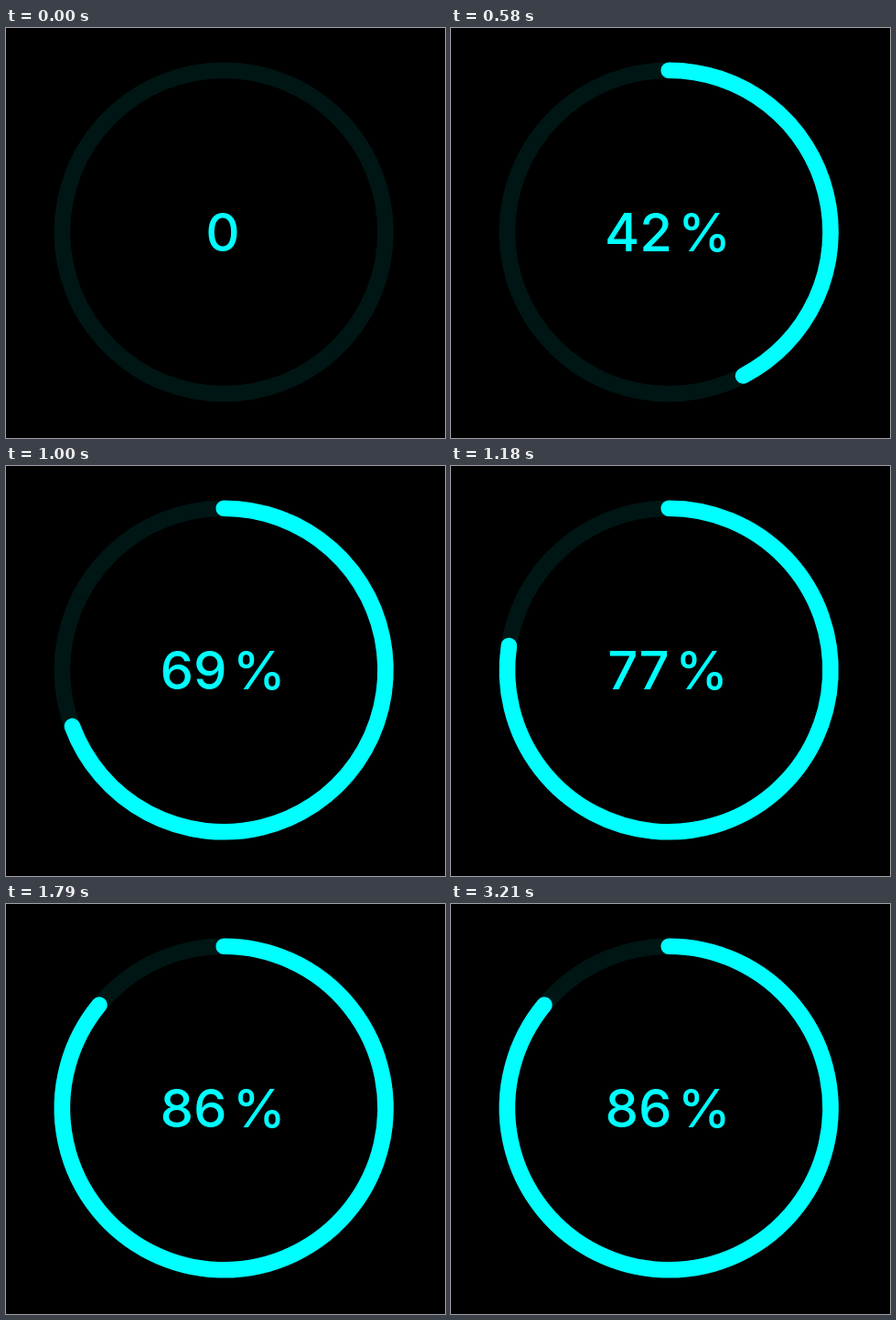
Write an HTML page that moves like this. It is 480 by 448 pixels and loops after 3.24 s.

```html
<!DOCTYPE html>
<html lang="en">
<head>
<meta charset="utf-8">
<title>Progress ring</title>
<style>
  html, body { margin: 0; width: 100%; height: 100%; overflow: hidden; background: #000; }
  svg { display: block; width: 100vw; height: 100vh; }
  circle { fill: none; stroke-width: 17.6; }
  text { font: 500 58px Inter, Roboto, sans-serif; word-spacing: -9px; fill: #0ff; text-anchor: middle; }
</style>
</head>
<body>
<svg viewBox="0 0 480 448">
  <circle cx="238.2" cy="223" r="176.8" stroke="#001615"/>
  <path id="arc" fill="none" stroke="#0ff" stroke-width="17.6" stroke-linecap="round"/>
  <text id="label" x="237" y="243.5">0</text>
</svg>
<script>
  const LOOP = 3240, START = 12, TURN = 810, END = 1595;
  const SPEED = 0.0745, GOAL = 86;
  const CX = 238.2, CY = 223, R = 176.8;
  const arc = document.getElementById('arc');
  const label = document.getElementById('label');

  // Constant speed up to TURN, then a sine ease-out to GOAL.
  function percent(t) {
    if (t < 30) return 0;
    if (t < TURN) return SPEED * (t - START);
    const from = SPEED * (TURN - START);
    const x = Math.min(1, (t - TURN) / (END - TURN));
    return from + (GOAL - from) * Math.sin(x * Math.PI / 2);
  }

  function draw(t) {
    const value = percent(t);
    const angle = value / 100 * 2 * Math.PI;
    const x = CX + R * Math.sin(angle), y = CY - R * Math.cos(angle);
    arc.setAttribute('d', value
      ? `M${CX} ${CY - R}A${R} ${R} 0 ${value > 50 ? 1 : 0} 1 ${x} ${y}` : '');
    label.textContent = value ? Math.round(value) + ' %' : '0';
  }

  const origin = performance.now();
  function tick() {
    draw((performance.now() - origin) % LOOP);
    requestAnimationFrame(tick);
  }
  draw(0);
  requestAnimationFrame(tick);
</script>
</body>
</html>
```
